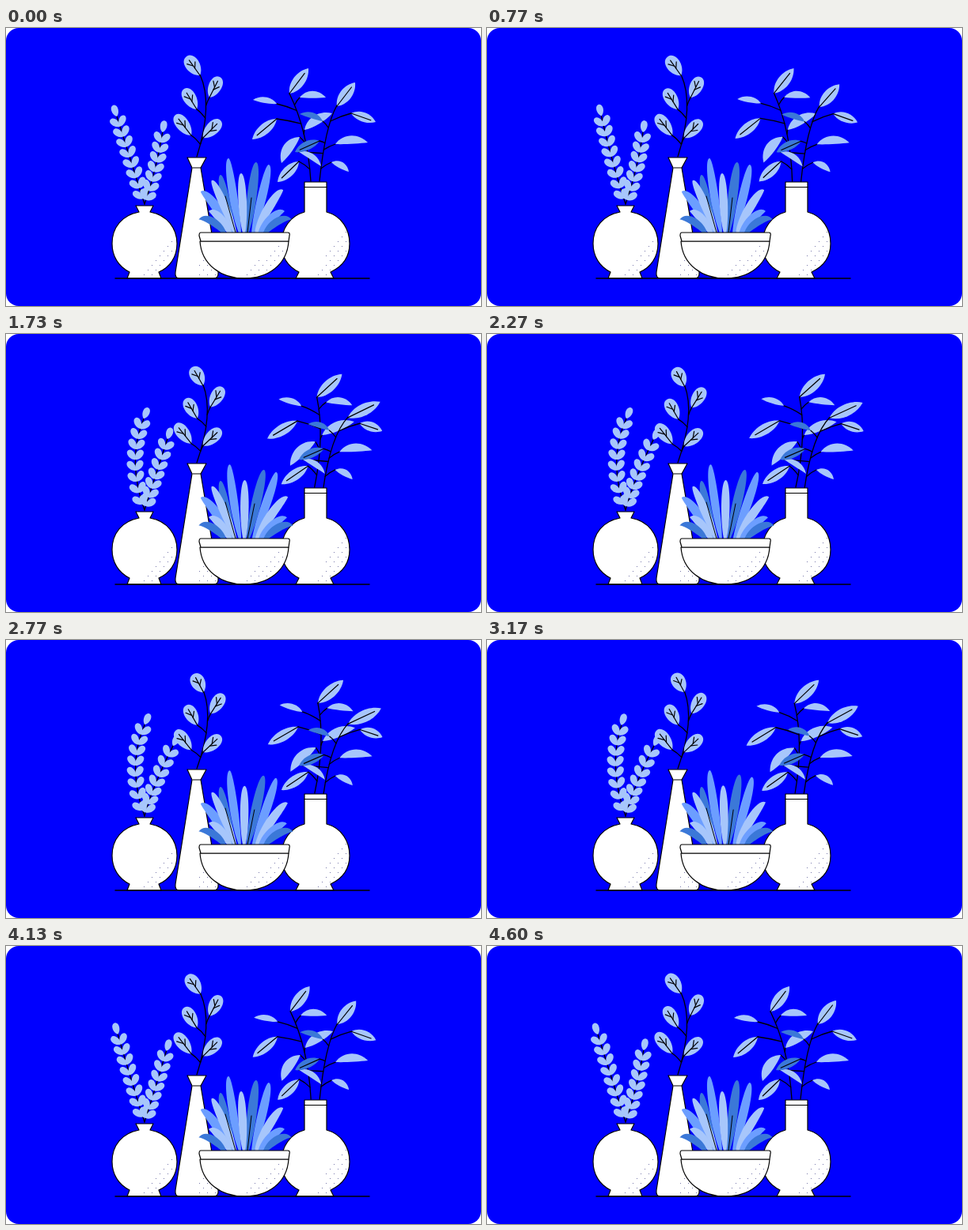
Write an HTML page with a canvas that moves like this. It is 600 px wide and 352 px high and loops after 4.63 s.

```html
<!DOCTYPE html>
<html>
<head>
<meta charset="utf-8">
<style>
html, body { margin: 0; width: 100%; height: 100%; overflow: hidden; background: #fff; }
canvas { display: block; background: #00f; border-radius: 16px; }
</style>
</head>
<body>
<canvas id="stage" width="600" height="352"></canvas>
<script>
const ctx = document.getElementById('stage').getContext('2d');
const LOOP = 4630;
const LIGHT = '#a7c6fb', MID = '#6c9eff', DARK = '#3b78d8';

// ---- timing ----
const clamp = v => Math.max(0, Math.min(1, v));
const lerp = (a, b, k) => a + (b - a) * k;
const ease = p => p < .5 ? .5 * (2 * p) ** 3.3 : 1 - .5 * (2 - 2 * p) ** 3.3;
const sway = (t, lag) => {
  const q = ((t - lag + LOOP) % LOOP) / LOOP * 2;
  return ease(q > 1 ? 2 - q : q);
};
const ramp = (t, start, length) => ease(clamp((t - start) / length));

// ---- drawing helpers ----
function line(points, width = 1.2) {
  ctx.beginPath();
  points.forEach(p => ctx.lineTo(...p));
  ctx.lineWidth = width;
  ctx.stroke();
}

function curve(a, c, b) {
  ctx.beginPath();
  ctx.moveTo(...a);
  ctx.quadraticCurveTo(...c, ...b);
  ctx.lineWidth = 1.3;
  ctx.stroke();
}

const onCurve = ([a, c, b], t) => [0, 1].map(i =>
  (1 - t) ** 2 * a[i] + 2 * t * (1 - t) * c[i] + t * t * b[i]);

// Leaf from base to tip; right and left are the bulges either side of its axis.
function leaf(base, tip, right, left, color, round, veins = 0) {
  const dx = tip[0] - base[0], dy = tip[1] - base[1], len = Math.hypot(dx, dy);
  const at = (along, side) => [
    base[0] + dx * along - dy / len * side,
    base[1] + dy * along + dx / len * side
  ];
  const [near, far] = round ? [.25, 1] : [.25, .72];
  ctx.beginPath();
  ctx.moveTo(...base);
  ctx.bezierCurveTo(...at(near, right), ...at(far, right), ...tip);
  ctx.bezierCurveTo(...at(far, -left), ...at(near, -left), ...base);
  ctx.fillStyle = color;
  ctx.fill();
  if (veins) line([base, at(.8, 0)]);
  if (veins > 1) {
    line([at(.6, 5), at(.38, 0)]);
    line([at(.72, -5), at(.5, 0)]);
  }
}

// Leaf rows: position on stem, base, tip, bulges, colour, veins.
function plant(stem, leaves, warp, round) {
  const bent = stem.map(warp);
  curve(...bent);
  for (const [t, bx, by, tx, ty, right, left, color, veins] of leaves) {
    const from = onCurve(bent, t), base = warp([bx, by]);
    curve(from, [(from[0] + base[0]) / 2, (from[1] + 2 * base[1]) / 3], base);
    leaf(base, warp([tx, ty]), right, left, color, round, veins);
  }
}

function fern(stem, pairs) {
  curve(...stem);
  for (let i = 0; i <= pairs; i++) {
    const t = .06 + .94 * i / pairs;
    const p = onCurve(stem, t), q = onCurve(stem, t - .04);
    const angle = Math.atan2(p[1] - q[1], p[0] - q[0]);
    for (const turn of i < pairs ? [-.65, .65] : [0]) {
      const tip = [p[0] + 15 * Math.cos(angle + turn), p[1] + 15 * Math.sin(angle + turn)];
      leaf(p, tip, 5.8, 5.8, LIGHT, true);
    }
  }
}

// ---- plants ----
const sprigStem = [[241, 163], [262, 96], [245, 59]];
const sprigLeaves = [
  [1, 245, 60, 228, 36, 12, 12, LIGHT, 2],
  [.55, 257, 88, 270, 62, 11, 11, LIGHT, 2],
  [.4, 241, 103, 225, 77, 11, 11, LIGHT, 2],
  [.12, 234, 136, 214, 110, 11, 11, LIGHT, 2],
  [.12, 249, 139, 271, 117, 11, 11, LIGHT, 2]
];

const branchStem = [[385, 194], [381, 130], [358, 83]];
const branchLeaves = [
  [.5, 377, 129, 412, 108, 4, 12, LIGHT],
  [1, 358, 83, 382, 51, 10, 10, LIGHT, 1],
  [.85, 371, 88, 404, 88, 1, 11, LIGHT],
  [.78, 342, 96, 312, 91, 8, 2, LIGHT],
  [.62, 342, 115, 311, 141, 9, 9, LIGHT, 1],
  [.38, 371, 138, 348, 171, 14, 3, LIGHT],
  [.12, 370, 169, 343, 195, 9, 9, LIGHT, 1]
];

const bushStem = [[396, 194], [403, 125], [418, 98]];
const bushLeaves = [
  [.6, 400, 118, 371, 109, 9, 1, DARK],
  [.28, 370, 157, 398, 175, 0, 10, LIGHT],
  [.4, 396, 143, 365, 157, 9, 6, DARK, 1],
  [1, 418, 99, 441, 69, 10, 10, LIGHT, 1],
  [.7, 436, 108, 467, 119, 7, 9, LIGHT, 1],
  [.32, 416, 147, 457, 145, 1, 13, LIGHT],
  [.12, 411, 170, 433, 182, 2, 9, LIGHT]
];

// Blade rows: base x, tip, bulges, colour.
const blades = [
  [289, 271, 186, 6, 8, DARK],
  [304, 316, 170, 8, 8, DARK],
  [297, 281, 165, 5, 9, MID],
  [310, 332, 173, 9, 6, MID],
  [288, 246, 207, 14, 2, MID],
  [292, 260, 193, 9, 5, LIGHT],
  [314, 350, 205, 2, 13, LIGHT],
  [301, 297, 184, 7, 7, LIGHT],
  [318, 352, 232, 0, 14, MID],
  [285, 256, 232, 14, 0, LIGHT],
  [324, 361, 243, -4, 17, DARK],
  [279, 243, 243, 17, -4, DARK]
];

// ---- pots ----
const roundVase = new Path2D('M164 225H186L182 233C204 237 216 254 216 273C216 290 207 303 193 309L196 317H153L156 309C142 302 134 289 134 273C134 252 147 237 168 233Z');
const tallVase = new Path2D('M229 164H253L246 177L268 309Q269 317 262 317H219Q213 317 214 309L235 177Z');
const neckVase = new Path2D('M377 195H405V233C424 238 434 255 434 273C434 290 425 302 410 309L414 317H366L370 309C356 302 348 290 348 273C348 254 359 238 377 233Z');
const bowl = new Path2D('M245 270C247 300 272 317 301 317C331 317 355 300 357 270Z');
const bowlRim = new Path2D('M246 259H356Q359 259 358 263L357 270H246L244 263Q244 259 246 259Z');

// Shading dots gather at the lower right of each pot.
function shade(path, cx, cy, w, h) {
  const dots = [];
  for (let row = 0; row < 26; row++) {
    for (let col = 0; col < 32; col++) {
      const x = 134 + col * 10 + row % 2 * 5, y = 168 + row * 6;
      const inside = [-3, 3].every(d => ctx.isPointInPath(path, x + d, y + 2));
      if (inside && (x - cx) / w + (y - cy) / h > .55) dots.push([x, y]);
    }
  }
  return [path, dots];
}
const vases = [
  shade(roundVase, 175, 274, 41, 55),
  shade(tallVase, 241, 255, 26, 90),
  shade(neckVase, 391, 274, 43, 55)
];
const bowlShape = shade(bowl, 301, 282, 56, 45);

function pot([path, dots]) {
  ctx.fillStyle = '#fff';
  ctx.fill(path);
  ctx.lineWidth = 1.2;
  ctx.stroke(path);
  ctx.fillStyle = '#77a';
  dots.forEach(([x, y]) => ctx.fillRect(x, y, 1, 1));
}

// ---- scene ----
function draw() {
  const t = performance.now() % LOOP;
  const main = sway(t, 15), late = sway(t, 580), sprig = sway(t, 250);
  const grass = ramp(t, 700, 1200) - ramp(t, 2450, 1250);

  ctx.clearRect(0, 0, 600, 352);
  ctx.strokeStyle = '#000';
  ctx.lineCap = ctx.lineJoin = 'round';

  fern([[175, 223], [lerp(157, 152, main), lerp(166, 160, main)],
    [lerp(140, 176, main), lerp(112, 107, main)]], 8);
  fern([[175, 223], [lerp(190, 185, late), lerp(180, 185, late)],
    [lerp(197, 211, late), lerp(132, 134, late)]], 7);

  plant(sprigStem, sprigLeaves, ([x, y]) => {
    const h = clamp((163 - y) / 125);
    return [x + 9 * h ** 3.5 * sprig, y + 7 * Math.sqrt(h) * sprig];
  }, true);

  const height = y => clamp((194 - y) / 140);
  plant(branchStem, branchLeaves, ([x, y]) =>
    [x + (5 + 40 * height(y)) * main, y + .12 * (x - 385) * main]);
  plant(bushStem, bushLeaves, ([x, y]) => {
    const h = height(y) ** 4;
    return [x + (5 + 45 * h) * main, y + (2 + 25 * h) * main];
  });

  vases.forEach(pot);
  line([[236, 177], [246, 177]]);
  line([[377, 201.5], [405, 201.5]]);

  for (const [bx, tx, ty, right, left, color] of blades) {
    const push = 10 * clamp((tx - 275) / 40) * (259 - ty) / 90 * grass;
    leaf([bx, 266], [tx + push, ty + push * .2], right, left, color, true);
  }
  line([[305, 259], [lerp(310, 314, grass), 215]], 1);
  line([[290, 259], [277, 213]], 1);

  pot(bowlShape);
  pot([bowlRim, []]);
  line([[138, 317], [459, 317]], 1.5);
  requestAnimationFrame(draw);
}
draw();
</script>
</body>
</html>
```
